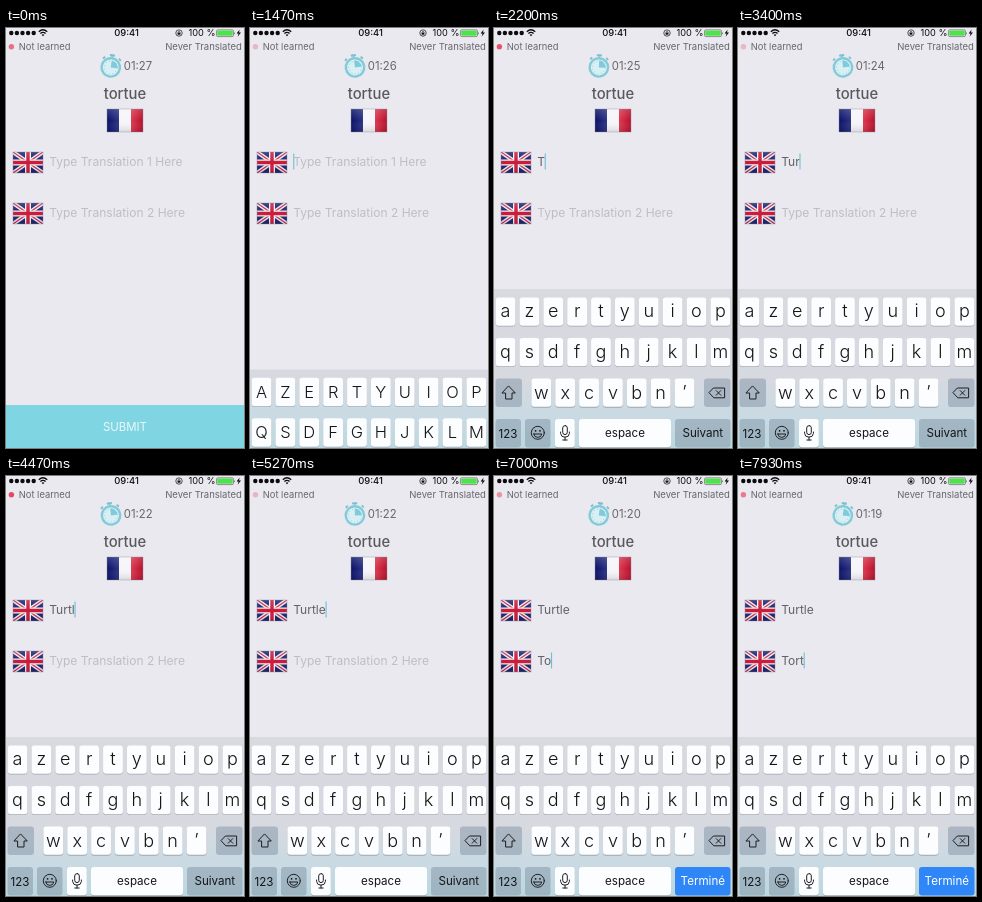
Write an HTML page that moves like this. It is 238 px wide and 420 px high and loops after 8000 ms.

```html
<!DOCTYPE html>
<html lang="en">
<head>
<meta charset="utf-8">
<title>Translation quiz</title>
<style>
html, body { margin: 0; width: 100%; height: 100%; overflow: hidden; background: #e9e9ef; }
svg { display: block; width: 100vw; height: 100vh; font-family: Inter, "Noto Sans", sans-serif; }
.mid { text-anchor: middle; }
.key { fill: #fcfdfe; }
.dark { fill: #64788c; fill-opacity: .36; }
.shade { fill: #7d8790; fill-opacity: .6; }
.letter { font-weight: 300; }
.line { fill: none; stroke: #1d1f22; stroke-width: 1; stroke-linejoin: round; stroke-linecap: round; }
</style>
</head>
<body>
<svg viewBox="0 0 238 420" preserveAspectRatio="none">
  <defs>
    <linearGradient id="tint" gradientUnits="userSpaceOnUse" x1="0" y1="261" x2="0" y2="420">
      <stop offset="0" stop-color="#d9d9e0"/><stop offset=".56" stop-color="#d7d9e0"/>
      <stop offset=".8" stop-color="#c9dae3"/><stop offset="1" stop-color="#bdd7df"/>
    </linearGradient>
    <linearGradient id="gloss" x2="0" y2="1">
      <stop offset="0" stop-color="#fff" stop-opacity=".16"/><stop offset=".5" stop-color="#fff" stop-opacity="0"/>
      <stop offset="1" stop-color="#000" stop-opacity=".12"/>
    </linearGradient>
    <linearGradient id="navy">
      <stop offset="0" stop-color="#0c1268"/><stop offset="1" stop-color="#2c3484"/>
    </linearGradient>
    <linearGradient id="red">
      <stop offset="0" stop-color="#dc3a50"/><stop offset="1" stop-color="#b80f2c"/>
    </linearGradient>
    <clipPath id="flagClip"><rect width="30" height="21"/></clipPath>
    <g id="uk">
      <g clip-path="url(#flagClip)">
        <rect width="30" height="21" fill="#1d2370"/>
        <path d="M0 0L30 21M30 0L0 21" stroke="#eeeaf0" stroke-width="4"/>
        <path d="M0 0L30 21M30 0L0 21" stroke="#c42c48" stroke-width="1.3"/>
        <path d="M15 0V21M0 10.5H30" stroke="#f3f0f4" stroke-width="6"/>
        <path d="M15 0V21M0 10.5H30" stroke="#c81c3a" stroke-width="3.4"/>
      </g>
      <rect width="30" height="21" fill="url(#gloss)" stroke="#8b8b9c" stroke-width=".4"/>
    </g>
  </defs>

  <rect width="238" height="420" fill="#e9e9ef"/>

  <g id="statusBar" fill="#0c0c0e">
    <path d="M5.3 5H28" stroke="#0c0c0e" stroke-width="4.4" stroke-linecap="round" stroke-dasharray="0 5.6"/>
    <path d="M32.8 3.8Q37 -.2 41.2 3.8M34.4 5.6Q37 3.2 39.6 5.6" fill="none" stroke="#0c0c0e" stroke-width="1.3"/>
    <path d="M35.6 6.8Q37 5.6 38.4 6.8L37 8.3Z"/>
    <text class="mid" x="120.5" y="8.3" font-size="9.4" font-weight="500">09:41</text>
    <circle cx="173" cy="5" r="3.2" fill="none" stroke="#0c0c0e" stroke-width=".7"/>
    <path d="M171.6 4.7H174.4V6.7H171.6Z"/>
    <path d="M172 4.8V4Q173 2.6 174 4V4.8" fill="none" stroke="#0c0c0e" stroke-width=".6"/>
    <text x="182.5" y="8.3" font-size="9.2">100 %</text>
    <rect x="210.5" y="1.8" width="17" height="6.8" rx="1.4" fill="none" stroke="#555" stroke-width=".6"/>
    <rect x="211.3" y="2.6" width="15.4" height="5.2" rx=".7" fill="#4fe24c"/>
    <path d="M228.3 4V6.4Q229.5 5.2 228.3 4Z"/>
    <path d="M233.6 1.6L230.6 5.6H232.6L231.6 8.8L235 4.6H233Z"/>
  </g>

  <circle id="dot" cx="5.4" cy="18.8" r="2.7" fill="#e8485f"/>
  <g fill="#66666b">
    <text x="12.8" y="21.6" font-size="9.35">Not learned</text>
    <text x="235.8" y="22.4" font-size="9.5" text-anchor="end">Never Translated</text>
    <text id="timer" x="117.8" y="41.8" font-size="11.3"></text>
    <text class="mid" x="119" y="70.8" font-size="14.8" font-weight="450" fill="#58585d">tortue</text>
  </g>

  <g id="clock">
    <rect x="-2.6" y="-12.2" width="5.2" height="2.2" rx=".8" fill="#7cc0d0"/>
    <path d="M0 -10V-8M7 -8.8L9 -6.8M-7 -8.8L-9 -6.8" stroke="#7cc0d0" stroke-width="1.8"/>
    <circle cy="1" r="9.2" fill="#d9eff4" stroke="#84cad9" stroke-width="2.4"/>
    <path d="M0 1V-5.8A6.8 6.8 0 0 1 6.8 1Z" fill="#7fcbdb"/>
    <circle cy="1" r="6.4" fill="none" stroke="#7fcbdb" stroke-width=".9" stroke-dasharray=".8 2.55"/>
  </g>

  <g transform="translate(101 81)">
    <rect width="36" height="23" fill="#f6f5f9"/>
    <rect width="12" height="23" fill="url(#navy)"/>
    <rect x="24" width="12" height="23" fill="url(#red)"/>
    <rect width="36" height="23" fill="url(#gloss)" stroke="#8b8b9c" stroke-width=".4"/>
  </g>

  <use href="#uk" x="7" y="124"/>
  <use href="#uk" x="7" y="175"/>
  <g font-size="12.05">
    <text class="field" x="43.2" y="138"></text>
    <text class="field" x="43.2" y="189"></text>
  </g>
  <rect id="caret" width="1.1" height="16" fill="#6fc0d6"/>

  <rect y="377" width="238" height="43" fill="#7fd5e2"/>
  <text class="mid" x="119" y="403" font-size="11.4" fill="#eaf8fa">SUBMIT</text>

  <rect id="backdrop" width="238" height="160" fill="url(#tint)"/>
  <g id="keyboard"></g>
</svg>
<script>
const LOOP = 8000, KEYBOARD_TOP = 261, KEYBOARD_HEIGHT = 159;
const FOCUS_FIRST = 1350, FOCUS_SECOND = 5500;
const $ = id => document.getElementById(id);
const fields = [
  { word: 'Turtle', times: [2000, 2700, 3200, 3800, 4250, 4800], placeholder: 'Type Translation 1 Here' },
  { word: 'Tort', times: [6500, 7000, 7400, 7750], placeholder: 'Type Translation 2 Here' }
];
const fieldNodes = document.querySelectorAll('.field');
const edits = [FOCUS_FIRST, ...fields[0].times, FOCUS_SECOND, ...fields[1].times];

const keyBox = (x, y, width) =>
  `<rect class="shade" x="${x}" y="${y + .9}" width="${width}" height="28.3" rx="3"/>
   <rect class="key" x="${x}" y="${y}" width="${width}" height="28.3" rx="3"/>`;
// Grey keys are translucent, so they carry no shadow underneath.
const greyKey = (x, y, width, id = '') =>
  `<rect ${id && `id="${id}"`} class="dark" x="${x}" y="${y}" width="${width}" height="28.6" rx="3"/>`;
const letterRow = (letters, x, y) => [...letters].map((letter, i) => {
  const left = x + i * 23.87;
  return keyBox(left, y, 19.8) +
    `<text class="mid letter" x="${left + 9.9}" y="${y + 20}" data-letter="${letter}"></text>`;
}).join('');
const label = (text, x, y, id = '') =>
  `<text ${id && `id="${id}"`} class="mid" x="${x}" y="${y}" font-size="11.6">${text}</text>`;

$('keyboard').innerHTML = `<g fill="#141518">
  ${letterRow('azertyuiop', 1.6, 269.4)}
  ${letterRow('qsdfghjklm', 1.6, 309.9)}
  ${letterRow('wxcvbn’', 37.4, 350.5)}
  ${greyKey(1.5, 350.5, 26.5, 'shift')}
  <path id="arrow" class="line" d="M14.8 358.2L21.3 365H18V371H11.6V365H8.3Z"/>
  ${greyKey(210, 350.5, 26.5)}
  <path class="line" d="M219.8 360H230.6V369.8H219.8L215.2 364.9ZM222.2 362.6L226.8 367.2M226.8 362.6L222.2 367.2"/>
  ${greyKey(1.5, 391, 25.5)}${label('123', 14, 409.9)}
  ${greyKey(31, 391, 25.5)}
  <circle class="line" cx="43.8" cy="404.8" r="6.5"/>
  <path class="line" d="M39.8 406H47.8Q47.2 409.4 43.8 409.4Q40.4 409.4 39.8 406Z"/>
  <circle cx="41.6" cy="402.8" r=".9"/><circle cx="46" cy="402.8" r=".9"/>
  ${keyBox(61, 391, 19.8)}
  <rect class="line" x="68.7" y="397.6" width="4.6" height="9" rx="2.3"/>
  <path class="line" d="M66.6 404V405.5Q67 409.2 71 409.2Q75 409.2 75.4 405.5V404M71 409.2V412M68.8 412H73.2"/>
  ${keyBox(85, 391, 92)}${label('espace', 131, 409)}
  ${greyKey(181, 391, 55.5, 'returnKey')}${label('Suivant', 208.8, 409, 'returnLabel')}
</g>`;
const letterNodes = document.querySelectorAll('.letter');

function drawFields(t) {
  const active = t < FOCUS_SECOND ? 0 : 1;
  fields.forEach((field, i) => {
    const typed = field.word.slice(0, field.times.filter(time => time <= t).length);
    const node = fieldNodes[i];
    node.textContent = typed || field.placeholder;
    node.setAttribute('fill', typed ? '#626268' : '#bebec5');
    if (i === active) {
      $('caret').setAttribute('x', 43.2 + (typed ? node.getComputedTextLength() - .3 : 0));
      $('caret').setAttribute('y', 125.5 + i * 51);
    }
  });
  const lastEdit = edits.filter(time => time <= t).pop();
  const visible = t >= FOCUS_FIRST && (t - lastEdit) % 1000 < 550;
  $('caret').setAttribute('opacity', visible ? 1 : 0);
}

function drawKeyboard(t) {
  const progress = Math.min(1, Math.max(0, (t - 1370) / 350));
  const offset = KEYBOARD_HEIGHT * (1 - progress) ** 2;
  $('keyboard').setAttribute('transform', `translate(0 ${offset})`);
  $('backdrop').setAttribute('y', KEYBOARD_TOP + offset);
  $('keyboard').setAttribute('opacity', progress ? 1 : 0);
  $('backdrop').setAttribute('opacity', progress ? 1 : 0);

  const second = t >= FOCUS_SECOND;
  const upper = t < fields[second ? 1 : 0].times[0];
  letterNodes.forEach(node => {
    const letter = node.dataset.letter;
    node.textContent = upper ? (letter === '’' ? '´' : letter.toUpperCase()) : letter;
    node.setAttribute('font-size', upper ? 16.5 : 18);
  });
  $('shift').setAttribute('class', upper ? 'key' : 'dark');
  $('arrow').style.fill = upper ? '#000' : 'none';
  $('returnKey').style.fill = second ? '#2f86f6' : '';
  $('returnKey').style.fillOpacity = second ? 1 : '';
  $('returnLabel').textContent = second ? 'Terminé' : 'Suivant';
  $('returnLabel').setAttribute('fill', second ? '#fff' : '#141518');
}

function draw(t) {
  const seconds = 27 - Math.floor((t + 500) / 990);
  $('timer').textContent = '01:' + seconds;
  $('dot').setAttribute('opacity', .65 + .35 * Math.cos((t - 400) / 1000 * Math.PI));
  const tilt = 8 * Math.cos(t / 500 * Math.PI);
  $('clock').setAttribute('transform', `translate(104.9 38.4) rotate(${tilt})`);
  drawFields(t);
  drawKeyboard(t);
}

const start = performance.now();
function frame() {
  draw((performance.now() - start) % LOOP);
  requestAnimationFrame(frame);
}
frame();
</script>
</body>
</html>
```
